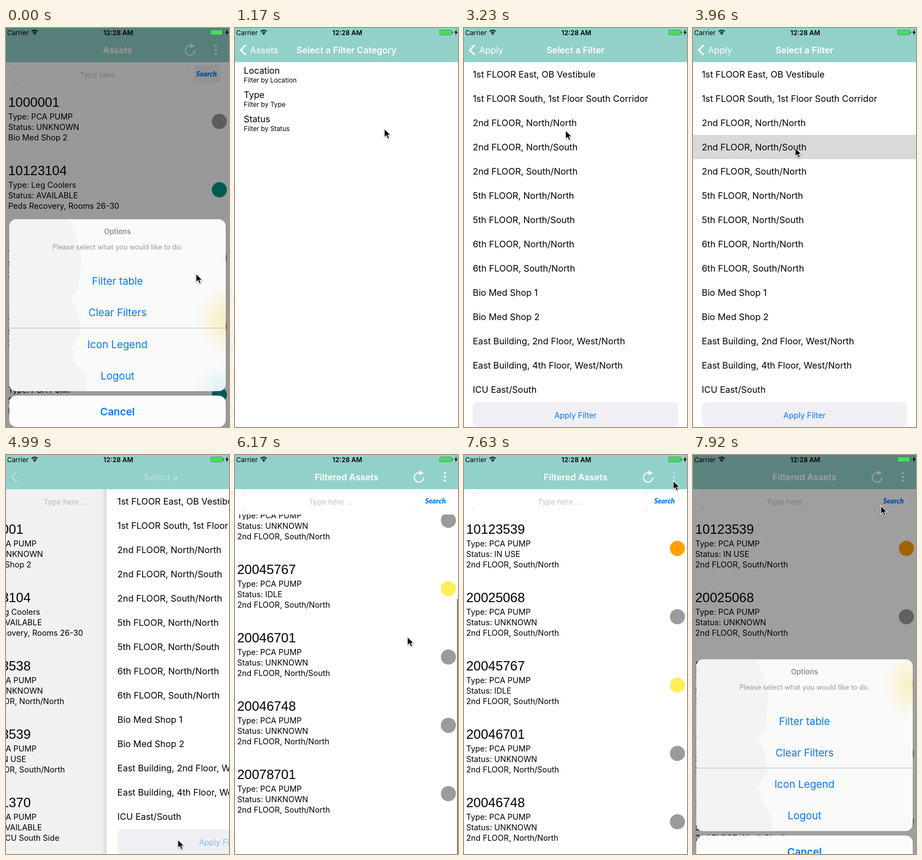
Write an HTML page that moves like this. It is 406 px wide and 724 px high and loops after 8000 ms.

```html
<!DOCTYPE html>
<html lang="en">
<head>
<meta charset="utf-8">
<title>Asset filter</title>
<style>
html, body { margin: 0; width: 100%; height: 100%; overflow: hidden; background: #fff; }
svg { display: block; width: 100vw; height: 100vh; }
text { font-family: Inter, Roboto, sans-serif; white-space: pre; }
.id { font: 24px "Liberation Sans", Arial, sans-serif; }
.line { font-size: 14.4px; }
.cell { font-size: 16.25px; }
.sub { font-size: 11.8px; }
.nav { font-size: 16.1px; fill: #fff; }
.bold { font-weight: 600; }
.mid { text-anchor: middle; }
.blue { fill: #007aff; }
.action { font-size: 18.7px; }
.search { font: italic 900 12.9px Lato, sans-serif; }
#cursor { filter: drop-shadow(0 1px 1px rgba(0, 0, 0, .35)); }
</style>
</head>
<body>
<svg id="stage" viewBox="0 0 406 724" preserveAspectRatio="none"></svg>
<script>
const LOOP = 8000, STEP = 7920 / 54, W = 406;
const LIST_TOP = 108, VIEW = 616, ROW = 124, MAX_SCROLL = 128;

const STATUS = { UNKNOWN: '#9b9b9b', AVAILABLE: '#009688', 'IN USE': '#ffa000', IDLE: '#ffee58' };
const PUMP = 'PCA PUMP', F2 = '2nd FLOOR, ';
const ALL = [
  ['1000001', PUMP, 'UNKNOWN', 'Bio Med Shop 2'],
  ['10123104', 'Leg Coolers', 'AVAILABLE', 'Peds Recovery, Rooms 26-30'],
  ['10123538', PUMP, 'UNKNOWN', F2 + 'North/North'],
  ['10123539', PUMP, 'IN USE', F2 + 'South/North'],
  ['10121370', PUMP, 'AVAILABLE', 'North PACU South Side']
];
const FILTERED = [
  ALL[3],
  ['20025068', PUMP, 'UNKNOWN', F2 + 'South/North'],
  ['20045767', PUMP, 'IDLE', F2 + 'South/North'],
  ['20046701', PUMP, 'UNKNOWN', F2 + 'North/South'],
  ['20046748', PUMP, 'UNKNOWN', F2 + 'North/North'],
  ['20078701', PUMP, 'UNKNOWN', F2 + 'South/North']
];
const PLACES = [
  '1st FLOOR East, OB Vestibule', '1st FLOOR South, 1st Floor South Corridor',
  F2 + 'North/North', F2 + 'North/South', F2 + 'South/North',
  '5th FLOOR, North/North', '5th FLOOR, North/South',
  '6th FLOOR, North/North', '6th FLOOR, South/North',
  'Bio Med Shop 1', 'Bio Med Shop 2',
  'East Building, 2nd Floor, West/North', 'East Building, 4th Floor, West/North',
  'ICU East/South'
];

// ---- markup helpers
const text = (x, y, cls, s, more = '') => `<text x="${x}" y="${y}" class="${cls}" ${more}>${s}</text>`;
const rect = (x, y, w, h, fill, more = '') =>
  `<rect x="${x}" y="${y}" width="${w}" height="${h}" fill="${fill}" ${more}/>`;
const group = (id, inner, more = '') => `<g id="${id}" ${more}>${inner}</g>`;

const assetRow = ([id, type, status, place], i) => `<g transform="translate(0 ${i * ROW})">
  ${text(4, 143, 'id', id)}${text(4, 166, 'line', 'Type: ' + type)}
  ${text(4, 185, 'line', 'Status: ' + status)}${text(4, 204, 'line', place)}
  <circle cx="388.5" cy="169.5" r="13.7" fill="${STATUS[status]}"/></g>`;

const assetPage = (name, rows, buttonFill) => group(name, `
  ${rect(0, 62, W, 662, '#fff')}
  ${group(name + 'Rows', rows.map(assetRow).join(''))}
  ${rect(0, 62, W, 46, '#fff')}
  <path d="M21 69.5Q16 69.5 16 74.5M16 95Q16 100 21 100M328 69.5Q333 69.5 333 74.5M333 95Q333 100 328 100"
    fill="none" stroke="#d0d0d0" stroke-width=".8"/>
  ${text(174, 89.5, 'mid', 'Type here ...', 'font-size="13.5" fill="#c4c4c8"')}
  ${rect(341, 67, 49, 33, buttonFill, 'rx="5"')}
  ${text(365, 87.5, 'search mid blue', 'Search')}`);

const catPage = group('cats', rect(0, 62, W, 662, '#fff')
  + rect(0, 62, W, 44, '#d9d9d9', 'id="catHit"')
  + ['Location', 'Type', 'Status'].map((s, i) =>
    text(16, 83 + 44 * i, 'nav', s, 'style="fill:#000"') + text(16, 99 + 44 * i, 'sub', 'Filter by ' + s)).join(''));

const filterPage = group('filters', rect(-12, 62, 8, 662, 'url(#edge)')
  + rect(-4, 62, W + 4, 662, '#fff')
  + rect(0, 0, W, 44, '#d9d9d9', 'id="placeHit"')
  + PLACES.map((s, i) => text(16, 90 + 44 * i, 'cell', s)).join('')
  + rect(0, 678, W, 46, '#fff') + rect(16, 679, 374, 45, '#efeff4', 'rx="9"')
  + text(203, 708, 'mid blue', 'Apply Filter', 'id="apply" font-size="14.3"'));

const navTitle = (name, s) => text(203, 46, 'nav bold mid', s, `id="${name}Title"`);
const backItem = (name, s) => group(name + 'Side',
  '<path d="M19.5 31L10.5 40L19.5 49" fill="none" stroke="#fff" stroke-width="3"/>'
  + text(27.5, 46, 'nav', s, `id="${name}Label"`));
const iconItem = name => group(name + 'Side', `
  <path d="M337 32.5A8.5 8.5 0 1 0 343.5 40.5" fill="none" stroke="#fff" stroke-width="2"/>
  <path d="M336 28L343.5 32.5L336 37Z" fill="#fff"/>
  <g id="${name}Dots" fill="#fff">${[32.5, 39.5, 46.5].map(y => `<circle cx="382" cy="${y}" r="2.1"/>`).join('')}</g>`);

const statusBar = `
  ${text(2, 13, '', 'Carrier', 'font-size="12"')}
  ${text(204.5, 13, 'bold mid', '12:28 AM', 'font-size="12"')}
  <g fill="none" stroke="#000" stroke-width="1.7">
    <path d="M46.6 6.2A8 8 0 0 1 57.8 6.2M48.7 8.5A5 5 0 0 1 55.7 8.5"/></g>
  <path d="M52.2 12.6L49.8 10.1A3.6 3.6 0 0 1 54.6 10.1Z"/>
  ${rect(372.5, 3.5, 22, 9, '#4cd964', 'rx="1.5" stroke="#2b6b38" stroke-width=".5"')}
  ${rect(395.5, 6.5, 1.5, 3.5, '#2b6b38')}
  <path d="M403.5 2.5L399.5 8.7H402L401 13.5L405.5 7H402.8Z"/>`;

const ACTIONS = ['Filter table', 'Clear Filters', 'Icon Legend', 'Logout'];
const sheet = group('sheet', `
  <g clip-path="url(#card)">
    ${rect(6, 347, 394, 312, '#fafafa')}
    <path d="M6 347H115L130 380L138 420L132 470L119 490L132 520L137 550L119 580L126 605L144 632L147 659H6Z" fill="#f3f3f3"/>
    <circle id="glow" cx="405" r="62" fill="url(#amber)"/>
    <circle id="glow2" cx="396" cy="665" r="55" fill="url(#teal)"/>
    ${rect(6, 544, 394, 1, '#b9b9b9')}
  </g>
  ${text(203, 374, 'bold mid', 'Options', 'font-size="13" fill="#8f8f8f"')}
  ${text(203, 402, 'mid', 'Please select what you would like to do.', 'font-size="12.6" fill="#999"')}
  ${ACTIONS.map((s, i) => text(203, 466 + 57.3 * i, 'action mid blue', s)).join('')}
  ${rect(6, 667, 394, 57, '#fcfcfc', 'rx="13"')}
  ${text(203, 703, 'action bold mid blue', 'Cancel')}`);

const fade = (id, color, a) => `<radialGradient id="${id}"><stop stop-color="${color}" stop-opacity="${a}"/>
  <stop offset="1" stop-color="${color}" stop-opacity="0"/></radialGradient>`;

document.getElementById('stage').innerHTML = `
  <defs>
    <clipPath id="card">${rect(6, 347, 394, 312, '#000', 'rx="13"')}</clipPath>
    <clipPath id="titles">${rect(90, 20, 225, 42, '#000')}</clipPath>
    <linearGradient id="edge"><stop stop-opacity="0"/><stop offset="1" stop-opacity=".12"/></linearGradient>
    ${fade('amber', '#f5e27a', .5)}${fade('teal', '#bfe6ea', .55)}
  </defs>
  ${rect(0, 0, W, 724, '#fff')}
  ${assetPage('assets', ALL, '#f3f3f8')}
  ${assetPage('filtered', FILTERED, '#fff')}
  ${rect(404, 0, 2, 10, '#8a8a8a', 'id="thumb" rx="1"')}
  ${rect(0, 62, W, 662, '#000', 'id="shade"')}
  ${catPage}${filterPage}
  ${rect(0, 0, W, 62, '#92d1ca')}
  <g clip-path="url(#titles)">
    ${navTitle('assets', 'Assets')}${navTitle('filtered', 'Filtered Assets')}
    ${navTitle('cats', 'Select a Filter Category')}${navTitle('filters', 'Select a Filter')}
  </g>
  ${iconItem('assets')}${iconItem('filtered')}${backItem('cats', 'Assets')}${backItem('filters', 'Apply')}
  ${rect(0, 0, W, 724, '#000', 'id="dim"')}
  ${statusBar}${sheet}
  <path id="cursor" d="M0 0V15.5L3.6 12.2L6.2 18L9 16.8L6.5 11.2H11.4Z" stroke="#fff" stroke-width="1.1"/>`;

// ---- motion
const $ = id => document.getElementById(id);
const clamp = x => Math.min(1, Math.max(0, x));
const ease = (t, start, span) => 1 - (1 - clamp((t - start) / span)) ** 2;
const between = (t, a, b) => t >= a && t < b;
const alpha = (id, a) => $(id).setAttribute('opacity', a);
const move = (id, x, y = 0) => $(id).setAttribute('transform', `translate(${x} ${y})`);

// Linear interpolation through [time, ...values]
function track(keys, t) {
  const i = keys.findIndex(k => k[0] > t);
  if (i === 0) return keys[0].slice(1);
  if (i < 0) return keys[keys.length - 1].slice(1);
  const a = keys[i - 1], b = keys[i], u = (t - a[0]) / (b[0] - a[0]);
  return a.slice(1).map((v, j) => v + (b[j + 1] - v) * u);
}

const POINTER = [
  [0, 346, 446], [140, 330, 450], [440, 240, 462], [650, 240, 462], [1173, 272, 183],
  [1600, 225, 92], [2350, 220, 92], [2700, 215, 110], [3227, 185, 186], [3660, 185, 178],
  [3950, 186, 216], [4240, 188, 260], [4320, 195, 275], [4690, 313, 698], [5200, 313, 698],
  [5600, 314, 550], [6160, 314, 330], [6550, 314, 322], [6900, 318, 480], [7040, 325, 420],
  [7480, 380, 50], [7627, 381, 47], [7680, 380, 48], [7920, 342, 92]
];
const SCROLL = [[5600, 0], [6160, 175], [6420, MAX_SCROLL], [6560, MAX_SCROLL], [6980, 0]];
const SHIFTS = [
  { at: 680, from: 'assets', to: 'cats' },
  { at: 2000, from: 'cats', to: 'filters' },
  { at: 4854, from: 'filters', to: 'filtered', pop: true }
];
const TAPS = [[3660, 2], [3950, 3], [4240, 4]];
const SCREENS = ['assets', 'filtered', 'cats', 'filters'];
const TITLE_SHIFT = 219;

function setNav(name, dx, a) {
  move(name + 'Title', dx);
  alpha(name + 'Title', a);
  alpha(name + 'Side', a);
  if ($(name + 'Label')) alpha(name + 'Label', a ** 3);
}

function drawScreens(t) {
  const body = {};
  let shade = 0;
  SCREENS.forEach(s => setNav(s, 0, 0));
  const shift = SHIFTS.filter(s => s.at <= t).pop();
  if (!shift) {
    body.assets = 0;
    setNav('assets', 0, 1);
  } else {
    const { from, to, pop } = shift, p = ease(t, shift.at, 500), dir = pop ? 1 : -1;
    const under = pop ? (t < 5360 ? 'assets' : to) : from, over = pop ? from : to;
    const cover = pop ? 1 - p : p;
    if (cover < 1) body[under] = -.3 * W * cover;
    if (cover > 0) body[over] = W * (1 - cover);
    shade = .1 * cover;
    setNav(from, dir * TITLE_SHIFT * p, clamp(1 - 1.5 * p));
    setNav(to, -dir * TITLE_SHIFT * (1 - p), clamp(2 * p - 1));
  }
  SCREENS.forEach(s => {
    $(s).style.display = s in body ? '' : 'none';
    move(s, body[s] || 0);
  });
  alpha('shade', shade);
}

function drawScroll(t) {
  const [y] = track(SCROLL, t), extra = Math.max(0, y - MAX_SCROLL);
  const ratio = VIEW / (VIEW + MAX_SCROLL), size = VIEW * ratio - extra;
  move('filteredRows', 0, -y);
  const thumb = $('thumb');
  thumb.setAttribute('y', LIST_TOP + Math.min(y, MAX_SCROLL) * ratio + extra);
  thumb.setAttribute('height', size);
  alpha('thumb', t < 5600 ? 0 : 1 - clamp((t - 6980) / 250));
}

function drawSheet(t) {
  const up = t < 4000 ? 1 - ease(t, 430, 330) : ease(t, 7680, 320);
  move('sheet', 0, 377 * (1 - up));
  alpha('dim', .4 * up);
  $('glow').setAttribute('cy', t < 4000 ? 530 : 394);
  alpha('glow2', t < 4000 ? 1 : 0);
}

function draw(t) {
  drawScreens(t);
  drawScroll(t);
  drawSheet(t);
  alpha('catHit', between(t, 1860, 2600) ? 1 : 0);
  const tap = TAPS.find(([at]) => between(t, at, at + 200));
  alpha('placeHit', tap ? 1 : 0);
  if (tap) move('placeHit', 0, 62 + 44 * tap[1]);
  alpha('apply', between(t, 4820, 5400) ? .45 : 1);
  alpha('filteredDots', between(t, 7560, 7700) ? .35 : 1);
  move('cursor', ...track(POINTER, t));
}

function tick(now) {
  const t = now % LOOP;
  draw(Math.floor((t + 7) / STEP) * STEP);
  requestAnimationFrame(tick);
}
requestAnimationFrame(tick);
</script>
</body>
</html>
```
